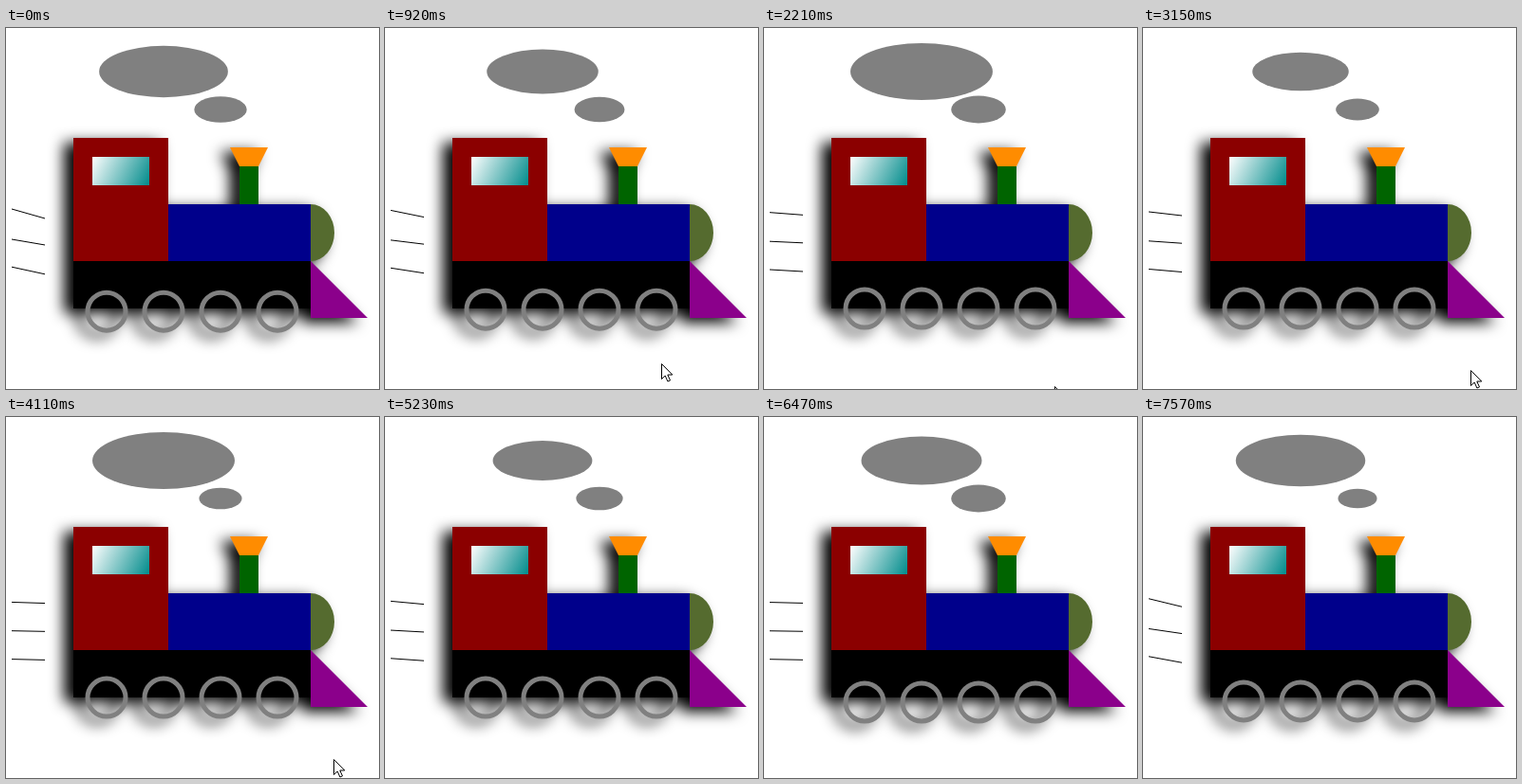
These frames come from a looping animation (393x381 px, 7650 ms). An HTML page:

```html
<!DOCTYPE html>
<html>
<head>
<meta charset="utf-8">
<style>
html, body { margin: 0; width: 100%; height: 100%; overflow: hidden; background: #fff; }
svg { display: block; }
</style>
</head>
<body>
<svg width="393" height="381" viewBox="0 0 393 381">
  <defs>
    <linearGradient id="glass" gradientUnits="userSpaceOnUse" x1="91" y1="136" x2="151" y2="166">
      <stop offset="0" stop-color="white"/>
      <stop offset="1" stop-color="darkcyan"/>
    </linearGradient>
    <filter id="shadow" filterUnits="userSpaceOnUse" x="0" y="80" width="393" height="301"
        color-interpolation-filters="sRGB">
      <feDropShadow dx="-10" dy="5" stdDeviation="7.5" flood-color="black"/>
    </filter>
  </defs>
  <g fill="gray">
    <ellipse id="puffBig" cx="166" cy="46"/>
    <ellipse id="puffSmall" cx="226" cy="86"/>
  </g>
  <g stroke="black">
    <line x1="6" x2="41"/>
    <line x1="6" x2="41"/>
    <line x1="6" x2="41"/>
  </g>
  <g filter="url(#shadow)">
    <ellipse cx="321" cy="216" rx="25" ry="30" fill="darkolivegreen"/>
    <rect x="71" y="116" width="100" height="130" fill="darkred"/>
    <rect x="91" y="136" width="60" height="30" fill="url(#glass)"/>
    <rect x="171" y="186" width="150" height="60" fill="darkblue"/>
    <rect x="246" y="146" width="20" height="40" fill="darkgreen"/>
    <path d="M236 126h40l-10 20h-20z" fill="darkorange"/>
    <rect x="71" y="246" width="250" height="50" fill="black"/>
    <path d="M321 246v60h60z" fill="darkmagenta"/>
    <g id="wheels" fill="none" stroke="gray" stroke-width="5">
      <circle cx="106" cy="296" r="20"/>
      <circle cx="166" cy="296" r="20"/>
      <circle cx="226" cy="296" r="20"/>
      <circle cx="286" cy="296" r="20"/>
    </g>
  </g>
  <path id="cursor" d="M.5 .5v16l3.7-3.5 2.7 6 2.6-1.1-2.7-5.9h5z" fill="white" stroke="black"/>
</svg>
<script>
const LOOP = 7650;
const get = id => document.getElementById(id);
const lines = document.querySelectorAll('line');

// Cosine with the given period that peaks at time `peak` (ms).
const wave = (t, period, peak = 0) => Math.cos(2 * Math.PI * (t - peak) / period);

// Pointer stops.
const stops = [
  { at: 300, x: 287, y: 386 },
  { at: 600, x: 291, y: 354 },
  { at: 1700, x: 291, y: 354 },
  { at: 2210, x: 306, y: 378 },
  { at: 3000, x: 345, y: 361 },
  { at: 4120, x: 345, y: 361 },
  { at: 4500, x: 368, y: 386 },
];

function pointer(t) {
  const i = stops.findIndex(s => s.at > t);
  if (i < 0) return stops[stops.length - 1];
  if (i === 0) return stops[0];
  const a = stops[i - 1], b = stops[i];
  const p = (t - a.at) / (b.at - a.at);
  return { x: Math.round(a.x + (b.x - a.x) * p), y: Math.round(a.y + (b.y - a.y) * p) };
}

function puff(id, rx, ry) {
  get(id).setAttribute('rx', rx);
  get(id).setAttribute('ry', ry);
}

function move(id, x, y) {
  get(id).setAttribute('transform', `translate(${x} ${y})`);
}

function draw(t) {
  const big = 0.838 + 0.162 * wave(t, 1890, 345);
  puff('puffBig', 75 * big, 30 * big);
  const small = 0.82 + 0.14 * wave(t, 710, 85);
  puff('puffSmall', 30 * small, 15 * small);

  move('wheels', 0, 2.5 + 2.5 * wave(t, 189, 40));

  const tilt = Math.abs(wave(t, 188.86));
  lines.forEach((line, i) => {
    const y = 196 + 30 * i, d = [5, 3, 3.8][i] * tilt;
    line.setAttribute('y1', y - d);
    line.setAttribute('y2', y + d);
  });

  const { x, y } = pointer(t);
  move('cursor', x, y);
}

const begin = performance.now();
function tick() {
  draw((performance.now() - begin) % LOOP);
  requestAnimationFrame(tick);
}
tick();
</script>
</body>
</html>
```
